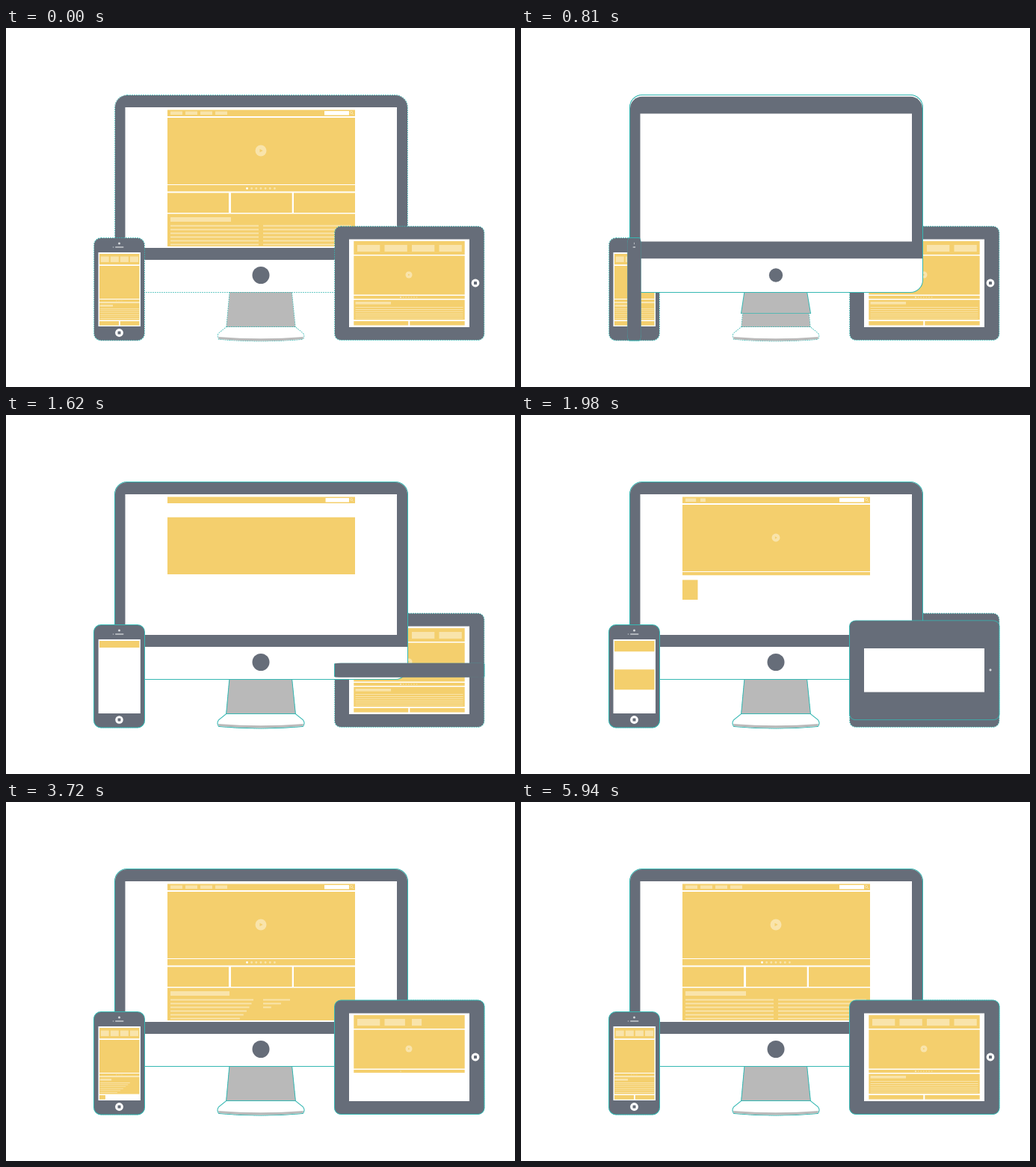
Recreate the animation shown at these times as an HTML page with a canvas. Size 681 by 480 pixels, loop 6000 ms.

```html
<!DOCTYPE html>
<html lang="en">
<head>
<meta charset="utf-8">
<title>Responsive wireframes</title>
<style>
  html, body { margin: 0; width: 100%; height: 100%; overflow: hidden; background: #fff; }
  canvas { display: block; }
</style>
</head>
<body>
<canvas id="stage" width="681" height="480"></canvas>
<script>
const ctx = document.getElementById('stage').getContext('2d');
const LOOP = 6000, STEP = 30;
const DARK = '#666d79', GOLD = '#f4cf6d', PALE = '#f9e4ab', WHITE = '#fff', GREY = '#b9b9b9', TEAL = '#35b8b3';

let now = 0;
let poster = false;

const progress = (start, dur) => {
  const t = Math.min(1, Math.max(0, (now - start) / dur));
  return 1 - (1 - t) ** 3;
};

// Each mode gives the fixed point of the growth; null leaves that axis alone.
const ORIGINS = {
  left: ([x1]) => [x1, null],
  right: ([, , x2]) => [x2, null],
  top: ([, y1]) => [null, y1],
  wide: ([x1, , x2]) => [(x1 + x2) / 2, null],
  tall: ([, y1, , y2]) => [null, (y1 + y2) / 2],
  rise: ([, y1, , y2]) => [null, y2 + 0.31 * (y2 - y1)],
  pop: ([x1, y1, x2, y2]) => [(x1 + x2) / 2, (y1 + y2) / 2]
};

function grow(start, dur, box, mode, paint) {
  const p = progress(start, dur);
  if (p <= 0) return;
  const [ox, oy] = ORIGINS[mode](box);
  const sx = ox === null ? 1 : p, sy = oy === null ? 1 : p;
  ctx.save();
  ctx.transform(sx, 0, 0, sy, (ox || 0) * (1 - sx), (oy || 0) * (1 - sy));
  paint();
  ctx.restore();
}

function fillBox([x1, y1, x2, y2], color, radius = 0) {
  ctx.fillStyle = color;
  ctx.beginPath();
  ctx.roundRect(x1, y1, x2 - x1, y2 - y1, radius);
  ctx.fill();
}

const rect = (start, dur, box, mode, color, radius) =>
  grow(start, dur, box, mode, () => fillBox(box, color, radius));

function disc(x, y, r, color) {
  ctx.fillStyle = color;
  ctx.beginPath();
  ctx.arc(x, y, r, 0, 7);
  ctx.fill();
}

const popDisc = (start, dur, x, y, r, color) =>
  grow(start, dur, [x, y, x, y], 'pop', () => disc(x, y, r, color));

// Strokes the current path so that only its outer half shows after the fill.
function fringe() {
  ctx.strokeStyle = TEAL;
  ctx.lineWidth = poster ? 1.4 : 2;
  ctx.setLineDash(poster ? [2, 1] : []);
  ctx.stroke();
  ctx.setLineDash([]);
}

function shell(start, box, mode, color, radius, extras) {
  grow(start, 800, box, mode, () => {
    const [x1, y1, x2, y2] = box;
    ctx.beginPath();
    ctx.roundRect(x1, y1, x2 - x1, y2 - y1, radius);
    fringe();
    fillBox(box, color, radius);
    if (extras) extras();
  });
}

function row(start, stagger, dur, xs, width, y1, y2) {
  xs.forEach((x, i) => rect(start + i * stagger, dur, [x, y1, x + width, y2], 'left', PALE));
}

function lines(start, x1, x2, y, gap, height) {
  for (let i = 0; i < 6; i++) {
    const top = y + i * gap;
    rect(start + i * 29, 700, [x1, top, x2, top + height], 'left', PALE);
  }
}

function dots(start, x, y, gap, r) {
  for (let i = 0; i < 7; i++) popDisc(start + i * 55, 250, x + i * gap, y, r, i ? PALE : WHITE);
}

function homeButton(start, x, y) {
  grow(start, 800, [x, y, x, y], 'pop', () => {
    disc(x, y, 5.4, WHITE);
    fillBox([x - 2, y - 2, x + 2, y + 2], DARK, 0.6);
  });
}

function play(start, x, y, r) {
  grow(start, 500, [x, y, x, y], 'pop', () => {
    disc(x, y, r, PALE);
    ctx.fillStyle = GOLD;
    ctx.beginPath();
    ctx.moveTo(x - r * 0.2, y - r * 0.3);
    ctx.lineTo(x + r * 0.35, y);
    ctx.lineTo(x - r * 0.2, y + r * 0.3);
    ctx.fill();
  });
}

function stand() {
  grow(600, 800, [295, 352, 387, 400], 'top', () => {
    ctx.fillStyle = GREY;
    ctx.beginPath();
    ctx.moveTo(299.5, 352);
    ctx.lineTo(382, 352);
    ctx.lineTo(387, 401);
    ctx.lineTo(295, 401);
    ctx.closePath();
    fringe();
    ctx.fill();
  });
  grow(920, 800, [283, 400, 399, 419], 'top', () => {
    ctx.beginPath();
    ctx.moveTo(295, 400);
    ctx.lineTo(387, 400);
    ctx.lineTo(397, 408);
    ctx.quadraticCurveTo(400, 412, 397, 416);
    ctx.quadraticCurveTo(341, 421, 285, 416);
    ctx.quadraticCurveTo(282, 412, 285, 408);
    ctx.closePath();
    fringe();
    ctx.fillStyle = WHITE;
    ctx.fill();
    ctx.fillStyle = GREY;
    ctx.beginPath();
    ctx.moveTo(284, 413);
    ctx.quadraticCurveTo(341, 417.5, 398, 413);
    ctx.lineTo(397, 416);
    ctx.quadraticCurveTo(341, 421, 285, 416);
    ctx.fill();
  });
}

function monitor() {
  stand();
  shell(38, [146, 90, 537, 353], 'tall', WHITE, 16);
  rect(214, 800, [146, 90, 537, 310], 'tall', DARK, [16, 16, 0, 0]);
  rect(369, 800, [159.5, 106, 523, 294], 'tall', WHITE);
  popDisc(482, 800, 341, 330.5, 11.5, DARK);

  rect(1037, 700, [216, 109.5, 467, 118], 'top', GOLD);
  row(1800, 120, 350, [220, 240, 260, 280], 16, 111.5, 116);
  rect(1300, 500, [426, 111, 459, 116.5], 'right', WHITE);
  grow(1400, 400, [462.5, 113.5, 462.5, 113.5], 'pop', () => {
    ctx.strokeStyle = PALE;
    ctx.lineWidth = 1;
    ctx.beginPath();
    ctx.arc(462, 113, 1.6, 0, 7);
    ctx.moveTo(463.2, 114.2);
    ctx.lineTo(465, 116);
    ctx.stroke();
  });
  rect(1310, 650, [216, 120, 467, 209], 'rise', GOLD);
  play(1803, 341, 164, 7.5);
  rect(1836, 700, [216, 210, 467, 218.5], 'top', GOLD);
  dots(2050, 322.5, 214.5, 6.15, 1.4);

  rect(1916, 700, [216, 220.5, 298, 247], 'left', GOLD);
  rect(2324, 700, [301, 220.5, 382.7, 247], 'top', GOLD);
  rect(2657, 700, [385, 220.5, 467, 247], 'right', GOLD);

  rect(2950, 650, [216, 248.5, 467, 292], 'top', GOLD);
  rect(3223, 700, [220, 253, 301, 259], 'left', PALE);
  lines(3293, 220, 338, 263.5, 5, 2);
  lines(3640, 344, 462, 263.5, 5, 2);
}

function phone() {
  shell(730, [118, 281, 185, 417.5], 'wide', DARK, 9, () => {
    disc(151.5, 288, 1.5, '#d5d8dc');
    disc(143.5, 293, 0.8, '#b9bdc4');
    fillBox([146, 292.2, 157.5, 293.8], '#c8cbd0', 0.8);
  });
  rect(960, 800, [123.5, 300, 180, 399], 'wide', WHITE);
  homeButton(1063, 151.5, 407.5);

  rect(1450, 600, [125, 302, 178.5, 316.3], 'top', GOLD);
  row(2440, 130, 350, [126.7, 139.8, 152.9, 166], 11, 305.5, 313);
  rect(1790, 700, [125, 318, 178.5, 362], 'rise', GOLD);
  rect(2530, 700, [125, 363, 178.5, 366.6], 'top', GOLD);
  dots(2850, 147.5, 364.8, 1.4, 0.4);
  rect(2900, 700, [125, 367.6, 178.5, 390.6], 'top', GOLD);
  rect(3356, 700, [125.5, 370, 143, 372.6], 'left', PALE);
  lines(3450, 125.5, 178, 375, 2.6, 0.9);
  rect(3640, 700, [125, 392, 151, 397.7], 'left', GOLD);
  rect(3980, 700, [152.8, 392, 178.5, 397.7], 'left', GOLD);
}

function tablet() {
  shell(1585, [440, 265.5, 639.5, 417], 'tall', DARK, 8);
  rect(1815, 800, [459, 282.5, 620, 400], 'tall', WHITE);
  homeButton(1900, 628, 341);

  rect(2230, 700, [465.3, 285, 613.7, 303], 'top', GOLD);
  row(3400, 130, 350, [470, 506.5, 543, 579.5], 30.3, 290, 299);
  rect(2546, 700, [465.3, 304.5, 613.7, 356.5], 'rise', GOLD);
  play(3050, 539, 330, 4.5);
  rect(3180, 600, [465.3, 358, 613.7, 362], 'top', GOLD);
  dots(3650, 528, 360, 3.6, 0.8);
  rect(3740, 700, [465.3, 363.5, 613.7, 390], 'top', GOLD);
  rect(4200, 700, [467.5, 366, 515, 369.5], 'left', PALE);
  lines(4330, 467.5, 611.5, 373, 2.9, 1);
  rect(4550, 700, [465.3, 392, 538.3, 397.5], 'left', GOLD);
  rect(4880, 700, [540.3, 392, 613.7, 397.5], 'left', GOLD);
}

function scene(time, isPoster) {
  now = time;
  poster = isPoster;
  monitor();
  phone();
  tablet();
}

function render(time) {
  ctx.fillStyle = WHITE;
  ctx.fillRect(0, 0, 681, 480);
  // The finished picture stays underneath while the devices are rebuilt over it.
  scene(LOOP, true);
  if (time > 0) scene(time, false);
}

const begin = performance.now();
function tick() {
  const elapsed = (performance.now() - begin) % LOOP;
  render(Math.floor(elapsed / STEP) * STEP);
  requestAnimationFrame(tick);
}
tick();
</script>
</body>
</html>
```
